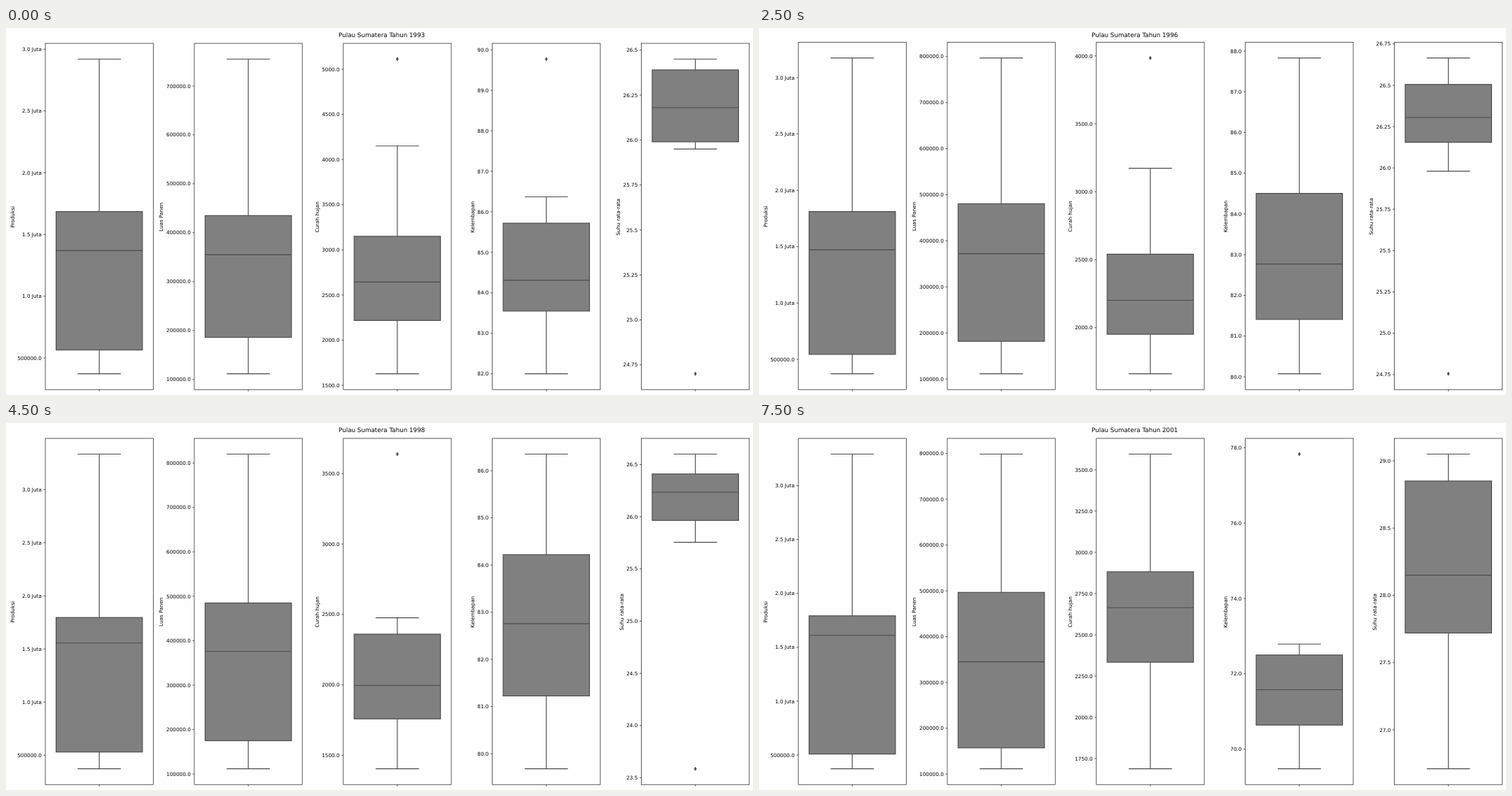
An HTML page that plays this animation: 1067 by 525 pixels, repeating every 8 s.

```html
<!DOCTYPE html>
<html lang="id">
<head>
<meta charset="utf-8">
<title>Box plot per tahun</title>
<style>
  html, body { margin: 0; width: 100%; height: 100%; overflow: hidden; background: #fefefe; }
  svg { display: block; width: 1067px; height: 525px; }
  text { font-family: "DejaVu Sans", Verdana, sans-serif; font-size: 7.28px; fill: #000; text-rendering: geometricPrecision; }
  .title { font-size: 8.75px; }
  .axis { fill: none; stroke: #000; stroke-width: .65; }
  .stat { fill: none; stroke: #494949; stroke-width: 1.15; }
  .box { fill: #808080; stroke: #494949; stroke-width: 1.15; }
  .flier { fill: #494949; stroke: #494949; stroke-width: .7; }
</style>
</head>
<body>
<svg id="stage" viewBox="0 0 1067 525"></svg>
<script>
const FIRST_YEAR = 1993, LOOP = 8000, STEP = 1000, LEAD = 500;
const FONT = 7.28, LEFT = 56.1, WIDTH = 154.2, GAP = 212.87, BOTTOM = 517.2;

// Years (counted from the first) that have key points; gaps are interpolated
const keys = [0, 2, 4, 6, 7, 8];

const harvest = {
  median: [1.37, 1.47, 1.474, 1.638, 1.623, 1.611],
  upper: [1.686, 1.859, 1.764, 1.828, 1.884, 1.792],
  high: [2.92, 3.135, 3.214, 3.453, 3.516, 3.293]
};

// Box: low whisker, Q1, median, Q3, high whisker, outliers...
const rain = [
  [1627, 2218, 2643, 3150, 4150, 5112],
  [2292, 2672, 2978, 3447, 4480, 5022, 1477],
  [1030, 1231, 1425, 1635, 1867, 2947],
  [1778, 2286, 2566, 3085, 3085, 4329],
  [841, 1439, 2227, 2734, 3256],
  [1688, 2334, 2664, 2882, 3595]
];
const humidity = [
  [82, 83.55, 84.31, 85.72, 86.37, 89.77],
  [81.68, 82.72, 83.39, 85.14, 87.68],
  [78.47, 80.1, 82.15, 83.87, 87.98],
  [80.89, 82.35, 83.36, 84.57, 84.72],
  [82.86, 83.18, 84.67, 85.14, 86.01, 90.6],
  [69.48, 70.64, 71.58, 72.5, 72.79, 77.83]
];
const warmth = [
  [25.95, 25.99, 26.18, 26.39, 26.45, 24.7],
  [26.12, 26.16, 26.25, 26.46, 26.58, 24.82],
  [25.84, 26.15, 26.36, 26.55, 26.75, 24.69],
  [25.67, 25.78, 26.11, 26.27, 26.45, 22.48],
  [24.22, 25.73, 26.54, 27.71, 28.2],
  [26.71, 27.72, 28.15, 28.85, 29.05]
];

function at(list, i) {
  const k = keys.findIndex(key => key >= i);
  if (keys[k] === i) return list[k];
  const a = list[k - 1], b = list[k], f = (i - keys[k - 1]) / (keys[k] - keys[k - 1]);
  const mix = (u, v) => u + (v - u) * f;
  return Array.isArray(a)
    ? a.slice(0, Math.min(a.length, b.length)).map((u, n) => mix(u, b[n]))
    : mix(a, b);
}

function production(i) {
  const { median, upper, high } = harvest;
  return [.372, .565 - .007 * i, at(median, i), at(upper, i), at(high, i)].map(v => v * 1e6);
}

// Harvested area follows production, with slowly changing yields
function area(i) {
  const [, , median, upper, high] = production(i);
  return [111500, 186000 - 450 * i * i, median * (.259 - .0007 * i * i),
    upper * (.258 + .0024 * i), high * Math.max(.2425, .2585 - .0025 * i)];
}

const panels = [
  ['Produksi', production],
  ['Luas Panen', area],
  ['Curah hujan', i => at(rain, i)],
  ['Kelembapan', i => at(humidity, i)],
  ['Suhu rata-rata', i => at(warmth, i)]
];

function niceStep(span) {
  const raw = span / 9, base = 10 ** Math.floor(Math.log10(raw));
  return base * [1, 2, 2.5, 5, 10].find(m => m * base >= raw);
}

function label(v) {
  const big = v >= 1e6, n = big ? v / 1e6 : v;
  return (Number.isInteger(n) ? n.toFixed(1) : String(n)) + (big ? ' Juta' : '');
}

const labelWidth = s => (s.replace(/\D/g, '').length * .636 + .318) * FONT;
const path = (cls, d) => `<path class="${cls}" d="${d}"/>`;
const rect = (cls, x, y, w, h) => `<rect class="${cls}" x="${x}" y="${y}" width="${w}" height="${h}"/>`;

function drawPanel(name, row, left, top) {
  const [lo, q1, med, q3, hi, ...fliers] = row;
  const min = Math.min(...row), max = Math.max(...row), pad = (max - min) * .05;
  const from = min - pad, to = max + pad, step = niceStep(to - from);
  const y = v => BOTTOM - (v - from) / (to - from) * (BOTTOM - top);
  const mid = left + WIDTH / 2, half = WIDTH * .4, cap = half / 2;
  let out = '', widest = 0;

  for (let k = Math.ceil(from / step); k * step <= to; k++) {
    const v = +(k * step).toFixed(4), s = label(v), ty = y(v);
    if (!s.includes('J')) widest = Math.max(widest, labelWidth(s));
    out += path('axis', `M${left} ${ty}h-2.55`)
      + `<text x="${left - 5.2}" y="${ty + 2.65}" text-anchor="end">${s}</text>`;
  }
  const nameX = left - 9.8 - widest, nameY = (top + BOTTOM) / 2 + .8;
  out += `<text transform="translate(${nameX} ${nameY}) rotate(-90)" text-anchor="middle">${name}</text>`;

  out += rect('box', mid - half, y(q3), half * 2, y(q1) - y(q3));
  out += path('stat', `M${mid - half} ${y(med)}h${half * 2}`
    + `M${mid} ${y(q1)}V${y(lo)}M${mid} ${y(q3)}V${y(hi)}`
    + `M${mid - cap} ${y(lo)}h${cap * 2}M${mid - cap} ${y(hi)}h${cap * 2}`);
  for (const v of fliers)
    out += path('flier', `M${mid} ${y(v) - 2.57}l1.55 2.57l-1.55 2.57l-1.55 -2.57z`);

  return out + rect('axis', left, top, WIDTH, BOTTOM - top)
    + path('axis', `M${mid} ${BOTTOM}v2.55`);
}

const stage = document.getElementById('stage');
let shown = -1;

function draw(i) {
  const top = i % 4 < 2 ? 22 : 20.3;
  stage.innerHTML = `<text class="title" x="536.7" y="12.8" text-anchor="middle">Pulau Sumatera Tahun ${FIRST_YEAR + i}</text>`
    + panels.map(([name, box], n) => drawPanel(name, box(i), LEFT + n * GAP, top)).join('');
  shown = i;
}

const start = performance.now();
function tick() {
  const t = (performance.now() - start) % LOOP;
  const i = Math.floor((t + LEAD) / STEP);
  if (i !== shown) draw(i);
  requestAnimationFrame(tick);
}
tick();
</script>
</body>
</html>
```
